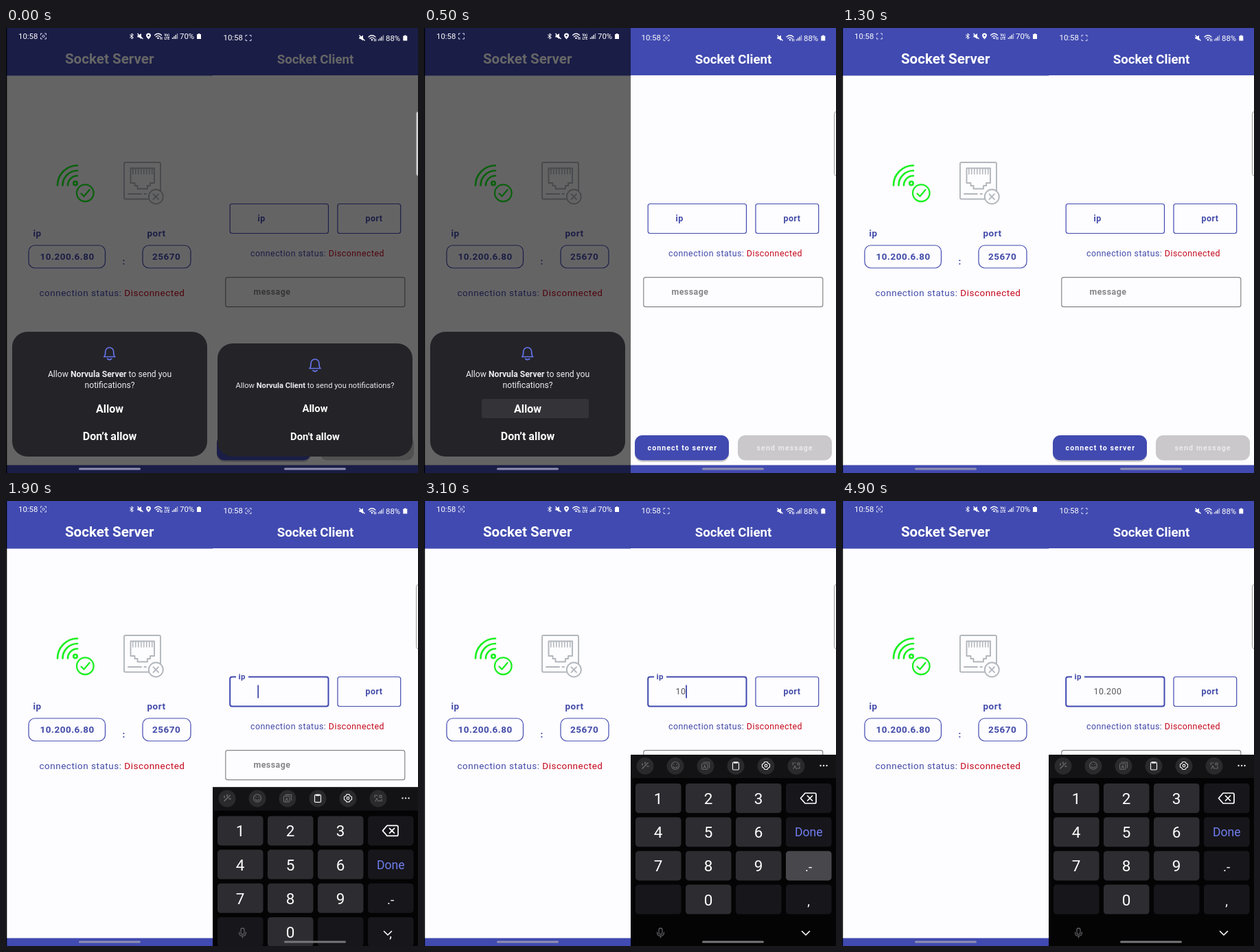
Recreate the animation shown at these times as an HTML page. Size 600x649 px, loop 5 s.

```html
<!DOCTYPE html>
<html lang="en">
<head>
<meta charset="utf-8">
<title>Socket demo</title>
<style>
html, body { margin: 0; width: 100%; height: 100%; overflow: hidden; background: #fff; }
svg { display: block; width: 600px; height: 649px; font-family: Roboto, Arial, sans-serif; }
.b { font-weight: 700; }
.m { text-anchor: middle; }
.ink { fill: #414aa8; }
.red { fill: #c4081c; }
.box { fill: none; stroke: #414ab0; stroke-width: 1.2; }
.l { font-size: 13.5px; letter-spacing: .5px; }
.r { font-size: 12.4px; letter-spacing: .47px; }
.btn { font-size: 10.6px; letter-spacing: 1.1px; font-weight: 700; }
.line { fill: none; stroke-linecap: round; stroke-linejoin: round; }
.status { font-size: 11.4px; fill: #fff; }
</style>
</head>
<body>
<svg viewBox="0 0 600 649" xmlns="http://www.w3.org/2000/svg">
  <defs>
    <g id="bell" class="line" stroke="#6474ea" stroke-width="1.7">
      <path d="M-8 4.500C-5.500 2-6-1-6-3A6 6 0 0 1 6-3C6-1 5.500 2 8 4.500Z"/>
      <path d="M-3 7.500Q0 10 3 7.500"/>
    </g>
    <g id="corners" class="line" stroke="#d4d6f0" stroke-width="1">
      <path d="M-4-2V-4H-2M2-4H4V-2M4 2V4H2M-2 4H-4V2"/>
    </g>
    <g id="mute">
      <path d="M-4-1.500H-2L1.500-4V4L-2 1.500H-4Z" fill="#fff"/>
      <path d="M-4-4L4 4" stroke="#fff" stroke-width="1.200"/>
    </g>
    <g id="wifi" class="line" stroke="#fff" stroke-width="1.200">
      <path d="M-5-1.500Q0-6 5-1.500M-3 .8Q0-2 3 .8"/>
      <circle cy="2.800" r=".7" fill="#fff"/>
      <path d="M3.500 1.500V4.500M5.500 1.500V4.500" stroke-width="1"/>
    </g>
    <g id="signal" stroke="#fff" stroke-width="1.300">
      <path d="M-3.500 4V2M-1.200 4V0M1.200 4V-2"/>
      <path d="M3.500 4V-4" opacity=".6"/>
    </g>
    <path id="battery" d="M-3-3H-1.200V-4H1.200V-3H3V4H-3Z" fill="#fff"/>
  </defs>

  <rect width="600" height="649" fill="#fdfcfe"/>

  <!-- server screen -->
  <path d="M1 0H301V69.500H1ZM1 637.500H301V649H1Z" fill="#414ab0"/>
  <text class="b m" x="150.700" y="52" font-size="20.600" fill="#fff">Socket Server</text>
  <g class="line" stroke="#1cf022" stroke-width="2.700">
    <path d="M75 229.500A29 29 0 0 1 104 200.500M82.500 229.500A21.500 21.500 0 0 1 104 208M90 229.500A14 14 0 0 1 104 215.500"/>
    <circle cx="101" cy="226.500" r="2.700"/>
    <circle cx="115.300" cy="240.700" r="12.300" fill="#fdfcfe" stroke-width="2.300"/>
    <path d="M109.500 241.500L113.500 245.500L121.500 236" stroke-width="2.300"/>
  </g>
  <g class="line" stroke="#b2b7bd" stroke-width="1.900">
    <rect x="172" y="196" width="53" height="53.500" rx="2"/>
    <path d="M181.500 204.500H216V226H210V230H206V234.500H191.500V230H187.500V226H181.500Z"/>
    <path id="pins" stroke-width="1.500"/>
    <path d="M178 242H197M201.500 242H204"/>
    <circle cx="218.300" cy="246" r="10.500" fill="#fdfcfe"/>
    <path d="M214.500 242.200L222 249.800M222 242.200L214.500 249.800"/>
  </g>
  <rect class="box" x="33" y="317" width="111.500" height="33" rx="9"/>
  <rect class="box" x="199" y="317" width="70" height="33" rx="9"/>
  <g class="l ink">
    <g class="b">
      <text x="39.500" y="304">ip</text>
      <text x="205.500" y="304">port</text>
      <text x="49.500" y="338">10.200.6.80</text>
      <text x="213" y="338">25670</text>
      <text x="169.500" y="345">:</text>
    </g>
    <text x="48.500" y="391">connection status: <tspan class="red">Disconnected</tspan></text>
  </g>

  <!-- client screen -->
  <path d="M301 0H600V69H301ZM301 637.500H600V649H301Z" fill="#414ab0"/>
  <text class="b m" x="450.500" y="52" font-size="18.700" fill="#fff">Socket Client</text>
  <rect class="box" id="ipBox" x="326.200" y="256.500" width="143.300" height="43" rx="3"/>
  <rect class="box" x="483" y="256.500" width="91.700" height="43" rx="3"/>
  <rect class="box" x="319.800" y="363.700" width="261" height="43" rx="3" style="stroke:#858587"/>
  <rect id="notch" x="335" y="253" width="18" height="7" fill="#fdfcfe"/>
  <g class="r">
    <text class="b ink" id="ipLabel">ip</text>
    <text class="b ink" x="523.500" y="282">port</text>
    <text class="b" x="360.500" y="389" fill="#858587">message</text>
    <text class="ink" x="356" y="332.500">connection status: <tspan class="red">Disconnected</tspan></text>
    <text id="typed" x="366.500" y="282" fill="#55555a"></text>
  </g>
  <rect id="caret" y="268.500" width="1.800" height="19" fill="#414aa8"/>
  <rect x="307" y="596" width="137" height="37" rx="11" fill="#000" opacity=".18"/>
  <rect x="307" y="594" width="137" height="36.500" rx="11" fill="#414ab0"/>
  <rect x="457" y="594" width="137" height="36.500" rx="11" fill="#cac8ca"/>
  <text class="btn" x="325.500" y="616" fill="#fff">connect to server</text>
  <text class="btn" x="484.500" y="616" fill="#ebeaeb">send message</text>

  <!-- permission dialogs -->
  <g id="askServer">
    <rect x="1" width="300" height="649" fill="#000" opacity=".6"/>
    <rect x="9" y="443" width="284" height="182" rx="22" fill="#242328"/>
    <rect id="tapServer" x="84" y="541" width="156" height="28" rx="3" fill="#343338"/>
    <use href="#bell" x="150.700" y="475"/>
    <g class="m" fill="#fff">
      <g font-size="12.200" fill="#ececee">
        <text x="151" y="509">Allow <tspan class="b">Norvula Server</tspan> to send you</text>
        <text x="151" y="525">notifications?</text>
      </g>
      <g class="b" font-size="16">
        <text x="151" y="560.500">Allow</text>
        <text x="151" y="601">Don’t allow</text>
      </g>
    </g>
  </g>
  <g id="askClient">
    <rect x="301" width="299" height="649" fill="#000" opacity=".6"/>
    <rect x="308" y="460" width="284" height="165" rx="22" fill="#242328"/>
    <rect id="tapClient" x="378" y="541" width="144" height="28" rx="3" fill="#343338"/>
    <use href="#bell" x="450" y="492"/>
    <g class="m" fill="#fff">
      <text x="450" y="525" font-size="11.150" fill="#ececee">Allow <tspan class="b">Norvula Client</tspan> to send you notifications?</text>
      <g class="b" font-size="14.800">
        <text x="450" y="560">Allow</text>
        <text x="450" y="600.500">Don't allow</text>
      </g>
    </g>
  </g>

  <rect x="597.500" y="122" width="9" height="93.500" rx="3" fill="#fff" fill-opacity=".72" stroke="#9a9a9c"/>

  <!-- keyboard -->
  <g id="keyboard">
    <rect x="301" y="370" width="299" height="290" fill="#040405"/>
    <rect x="301" y="370" width="299" height="34" fill="#131316"/>
    <g id="tools" fill="#2a2a2d"></g>
    <g class="line" stroke="#66666a" stroke-width="1.200">
      <path d="M318 390L324 384M322 381V383M327 387H325M326 382L325 383M318 383V385" stroke-width="1.700"/>
      <circle cx="366" cy="386" r="5.500"/>
      <path d="M363 387.500Q366 391 369 387.500M364 384V384.500M368 384V384.500"/>
      <rect x="404.500" y="383" width="8.500" height="8.500" rx="1.500"/>
      <path d="M407 381H415.500V389M407 390L408.800 385.500L410.500 390"/>
      <path d="M537 385V382H541M547 387V390H543M538 390.500L540 386L542 390.500M544 382H547V385H544Z"/>
      <g stroke="#f2f2f4">
        <rect x="449.500" y="381" width="9" height="11" rx="1.500"/>
        <path d="M452 381.500H456" stroke-width="2.500"/>
        <path d="M496 380.500H500L501 382.500L503.500 384V388L501 389.500L500 391.500H496L495 389.500L492.500 388V384L495 382.500Z"/>
        <circle cx="498" cy="386" r="1.800"/>
        <path d="M577.500 386H577.600M582 386H582.100M586.500 386H586.600" stroke-width="2.300"/>
      </g>
    </g>
    <g id="keys" class="m" font-size="22.500" fill="#fff"></g>
    <path class="line" stroke="#fff" stroke-width="1.700" d="M548.500 433.500L555 426H569Q571 426 571 428V439Q571 441 569 441H555ZM558.500 430L565.500 437M565.500 430L558.500 437"/>
  </g>
  <g id="keyNav" class="line" stroke="#5c5c60" stroke-width="1.300">
    <rect x="342" y="623" width="5" height="9" rx="2.500"/>
    <path d="M339.500 629Q339.500 634.500 344.500 634.500T349.500 629M344.500 634.500V637"/>
    <path d="M550.500 627.500L556 633L561.500 627.500" stroke="#fff" stroke-width="1.600"/>
  </g>

  <!-- system bars -->
  <rect x="106" y="641.500" width="90" height="3" rx="1.500" fill="#8f90b0"/>
  <rect id="homeClient" x="405" y="641.500" width="90" height="3" rx="1.500"/>
  <g class="status">
    <text x="18" y="16">10:58</text>
    <use href="#corners" x="54.500" y="12"/>
    <circle id="recServer" cx="54.500" cy="12" r="1.600" fill="none" stroke="#d4d6f0"/>
    <path class="line" stroke="#fff" d="M180.500 10L185.500 14L183 16V8L185.500 10L180.500 14"/>
    <use href="#mute" x="195.500" y="12"/>
    <path fill="#fff" fill-rule="evenodd" d="M207.500 16.500Q204 12.500 204 11A3.500 3.500 0 0 1 211 11Q211 12.500 207.500 16.500ZM206.300 11A1.200 1.200 0 0 0 208.700 11A1.200 1.200 0 0 0 206.300 11Z"/>
    <use href="#wifi" x="221.500" y="12"/>
    <g class="m b" font-size="4.800"><text x="234.300" y="11.500">Vo)</text><text x="234.300" y="16.500">LTE</text></g>
    <use href="#signal" x="246" y="12"/>
    <text x="253" y="16">70%</text>
    <use href="#battery" x="281" y="12"/>
    <text x="316.500" y="18">10:58</text>
    <use href="#corners" x="353" y="14.500"/>
    <circle id="recClient" cx="353" cy="14.500" r="1.600" fill="none" stroke="#d4d6f0"/>
    <use href="#mute" x="518.500" y="14.500"/>
    <use href="#wifi" x="533" y="14.500"/>
    <use href="#signal" x="546" y="14.500"/>
    <text x="553" y="18.500">88%</text>
    <use href="#battery" x="581.300" y="14.500"/>
  </g>
  <rect width="1.300" height="649" fill="#000"/>
</svg>
<script>
const LOOP = 5000;
const $ = id => document.getElementById(id);
const set = (id, name, value) => $(id).setAttribute(name, value);
const show = (id, on) => set(id, 'visibility', on ? 'visible' : 'hidden');
const within = (t, a, b) => t >= a && t < b;
const ramp = (t, start, span) => Math.min(1, Math.max(0, (t - start) / span));

function add(parent, tag, attrs, text = '') {
  const el = document.createElementNS('http://www.w3.org/2000/svg', tag);
  for (const k in attrs) el.setAttribute(k, attrs[k]);
  el.textContent = text;
  return $(parent).appendChild(el);
}

let pins = '';
for (let i = 0; i < 8; i++) pins += `M${184.800 + i * 4} 205V213`;
set('pins', 'd', pins);

for (let i = 0; i < 6; i++) add('tools', 'circle', { cx: 322 + i * 44, cy: 386.500, r: 12.500 });

const labels = ['1', '2', '3', '', '4', '5', '6', 'Done', '7', '8', '9', '.-', '', '0', '', ','];
const keys = labels.map((label, i) => {
  const x = 308 + (i % 4) * 73, y = 412 + Math.floor(i / 4) * 49.200;
  const base = /\d/.test(label) ? '#2d2c31' : '#17161b';
  const rect = add('keys', 'rect', { x, y, width: 66.500, height: 43, rx: 4.500, fill: base });
  const done = label === 'Done';
  add('keys', 'text', {
    x: x + 33.200, y: y + (done ? 28 : 30),
    'font-size': done ? 17.600 : i % 4 === 3 ? 19 : 22.500,
    fill: done ? '#6f7dec' : '#fff'
  }, label);
  return { rect, base };
});

// key index, down, up
const presses = [[0, 2050, 2200], [13, 2250, 2400], [11, 3050, 3250], [1, 3500, 3650], [13, 4050, 4250], [13, 4350, 4500]];
// time, field content, start of caret blink
const edits = [
  [0, '', 1500], [2100, '1', 2100], [2300, '10', 2100], [3200, '10.', 3200],
  [3550, '10.2', 3550], [4080, '10.20', 4080], [4400, '10.200', 4400]
];
const textWidth = s => [...s].reduce((w, c) => w + (c === '.' ? 3.730 : 7.430), 0);

function drawDialogs(t) {
  const server = 1 - ramp(t, 510, 90), client = 1 - ramp(t, 200, 200);
  set('askServer', 'opacity', server);
  set('askClient', 'opacity', client);
  set('tapServer', 'opacity', +within(t, 400, 600));
  set('tapClient', 'opacity', +within(t, 100, 400));
}

function drawField(t) {
  const focus = ramp(t, 1450, 150);
  set('ipBox', 'style', `stroke-width:${1.200 + .8 * focus}`);
  show('notch', focus > .5);
  set('ipLabel', 'transform', `translate(${366.500 - 28 * focus} ${282 - 22 * focus}) scale(${1 - .07 * focus})`);

  const [, text, blink] = edits.filter(e => e[0] <= t).pop();
  $('typed').textContent = text;
  set('caret', 'x', 366.300 + textWidth(text));
  show('caret', t >= 1500 && (t - blink) % 1000 < 500);
}

function drawKeyboard(t) {
  const left = 1 - ramp(t, 1700, 342);
  const up = t >= 1700;
  show('keyboard', up);
  show('keyNav', up);
  set('keyboard', 'transform', `translate(0 ${279 * left * left})`);
  set('homeClient', 'fill', up ? '#77777a' : '#8f90b0');
  keys.forEach((key, i) => {
    const down = presses.some(([k, a, b]) => k === i && within(t, a, b));
    key.rect.setAttribute('fill', down ? '#48474c' : key.base);
  });
}

function draw(t) {
  drawDialogs(t);
  drawField(t);
  drawKeyboard(t);
  show('recServer', (t + 250) % 1000 < 500);
  show('recClient', within(t % 1400, 350, 650));
}

const start = performance.now();
function tick() {
  draw((performance.now() - start) % LOOP);
  requestAnimationFrame(tick);
}
tick();
</script>
</body>
</html>
```
